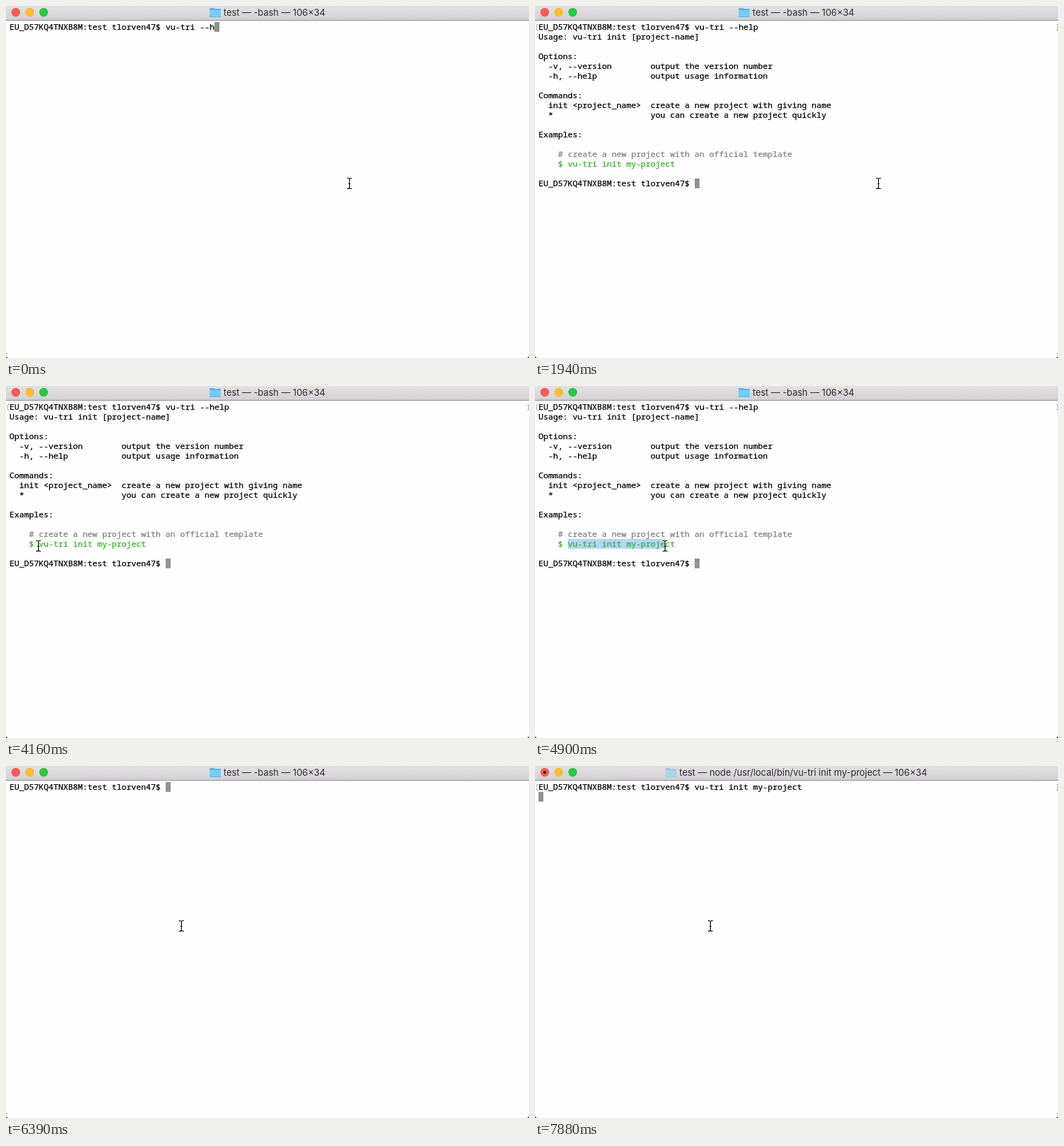
These frames come from a looping animation (750 by 504 pixels, 8 s). An HTML page with a canvas:

```html
<!DOCTYPE html>
<html lang="en">
<head>
<meta charset="utf-8">
<title>Terminal</title>
<style>
  html, body { margin: 0; width: 100%; height: 100%; overflow: hidden; background: #fefefe; }
  canvas { display: block; }
</style>
</head>
<body>
<canvas id="stage" width="750" height="504"></canvas>
<script>
const ctx = document.getElementById('stage').getContext('2d');
const LOOP = 8000, COL = 7, ROW = 14, LEFT = 5, TOP = 23;
const MONO = '500 11.667px "Noto Sans Mono", "DejaVu Sans Mono", monospace';
const SANS = '13px Inter, "Liberation Sans", sans-serif';
const GREEN = '#2fb71f', GREY = '#808080';
const PROMPT = 'EU_D57KQ4TNXB8M:test tlorven47$ ';
const HELP = 'vu-tri --help', INIT = 'vu-tri init my-project';

const option = (name, info) => ('  ' + name).padEnd(23) + info;
const output = [
  'Usage: vu-tri init [project-name]',
  '',
  'Options:',
  option('-v, --version', 'output the version number'),
  option('-h, --help', 'output usage information'),
  '',
  'Commands:',
  option('init <project_name>', 'create a new project with giving name'),
  option('*', 'you can create a new project quickly'),
  '',
  'Examples:',
  '',
  '    # create a new project with an official template',
  '    $ ' + INIT,
];

// Held values: [start time, value...]
const typed = [[0, 10], [140, 11], [290, 12], [590, 13]];
const pointer = [
  [0, 492, 254],
  [2980, 474, 252], [3130, 390, 241], [3270, 262, 228], [3420, 148, 219],
  [3570, 74, 216], [3720, 40, 217], [3860, 34, 224], [4010, 45, 229], [4160, 46, 229],
  [4460, 54, 229], [4610, 92, 229], [4760, 146, 229], [4900, 186, 229], [5050, 199, 229],
  [5650, 222, 229], [5790, 251, 229],
];
const at = (track, t) => track.findLast(key => key[0] <= t);

function rect(x, y, w, h, color) {
  ctx.fillStyle = color;
  ctx.fillRect(x, y, w, h);
}

function disc(x, y, r, color) {
  ctx.fillStyle = color;
  ctx.beginPath();
  ctx.arc(x, y, r, 0, 7);
  ctx.fill();
}

function stroke(path, color, width = 1) {
  ctx.strokeStyle = color;
  ctx.lineWidth = width;
  ctx.stroke(new Path2D(path));
}

// A hairline outline gives the glyphs their medium weight.
function print(text, row, color = '#000', col = 0) {
  const x = LEFT + col * COL, y = TOP + 11 + row * ROW;
  ctx.font = MONO;
  ctx.fillStyle = ctx.strokeStyle = color;
  ctx.lineWidth = 0.25;
  ctx.fillText(text, x, y);
  ctx.strokeText(text, x, y);
}

function caret(col, row) {
  rect(LEFT + col * COL, TOP + row * ROW, COL, ROW, '#919191');
}

function titleBar(command) {
  const shade = ctx.createLinearGradient(0, 0, 0, 20);
  shade.addColorStop(0, '#e3e1e3');
  shade.addColorStop(1, '#d2d0d2');
  rect(0, 0, 750, 20, shade);
  rect(0, 20, 750, 1, '#908e90');

  [['#fc5b57', '#ee504b'], ['#fdbd2f', '#eeb02a'], ['#28c840', '#22ba36']].forEach(([fill, rim], i) => {
    disc(14 + i * 20, 9, 6.2, rim);
    disc(14 + i * 20, 9, 5.6, fill);
  });
  if (command) disc(14, 9, 2.2, '#4d0000');

  const label = `test — ${command ? 'node /usr/local/bin/' + command : '-bash'} — 106×34`;
  ctx.font = SANS;
  const x = Math.round(375 - (ctx.measureText(label).width + 20) / 2);
  ctx.fillStyle = '#2c2c2c';
  ctx.fillText(label, x + 20, 14);

  const [edge, face] = command ? ['#9dcde4', '#a8d6ea'] : ['#55b5e6', '#72cdfa'];
  rect(x, 3, 7, 3, edge);
  rect(x, 4, 16, 12, edge);
  rect(x, 6, 16, 9, face);
}

function lineMarks() {
  stroke('M5 26.5H2.5V34.5H5M747.5 26.5H749.5V34.5H747.5', '#b0b0b0');
}

function iBeam(x, y) {
  ctx.save();
  ctx.translate(x + 0.5, y);
  const shape = 'M-3.5 -7.5H-2Q0 -7.5 0 -5.5Q0 -7.5 2 -7.5H3.5M0 -6V6' +
    'M-3.5 7.5H-2Q0 7.5 0 5.5Q0 7.5 2 7.5H3.5M-1.5 .5H1.5';
  stroke(shape, '#ffffff90', 2.4);
  stroke(shape, '#000', 1.1);
  ctx.restore();
}

function helpScreen(t) {
  const [, count] = at(typed, t);
  print(PROMPT, 0);
  print(HELP.slice(0, count), 0, '#000', PROMPT.length);
  if (t < 740) {
    caret(PROMPT.length + count, 0);
    return;
  }
  lineMarks();
  if (t < 1940) {
    caret(0, 1);
    return;
  }

  if (t >= 4460 && t < 5940) {
    const [, x] = at(pointer, t);
    const cols = Math.min(INIT.length, Math.round((x - 47) / COL));
    rect(47, TOP + 14 * ROW, cols * COL, ROW, '#b4d5fe');
  }
  output.forEach((line, i) => print(line, i + 1, i === 12 ? GREY : i === 13 ? GREEN : '#000'));
  print(PROMPT, 16);
  caret(PROMPT.length, 16);
}

function initScreen(t) {
  const command = t < 6840 ? '' : INIT;
  print(PROMPT + command, 0);
  if (t < 7740) {
    caret(PROMPT.length + command.length, 0);
  } else {
    lineMarks();
    caret(0, 1);
  }
}

function draw() {
  const t = performance.now() % LOOP;
  rect(0, 0, 750, 504, '#fefefe');
  titleBar(t >= 7880 ? INIT : t >= 890 && t < 1940 ? HELP : '');
  (t < 6390 ? helpScreen : initScreen)(t);
  const [, x, y] = at(pointer, t);
  iBeam(x, y);
  ctx.fillStyle = '#22252c';
  ctx.fill(new Path2D('M0 500Q0 504 4 504H0ZM750 500Q750 504 746 504H750Z'));
  requestAnimationFrame(draw);
}
draw();
</script>
</body>
</html>
```
